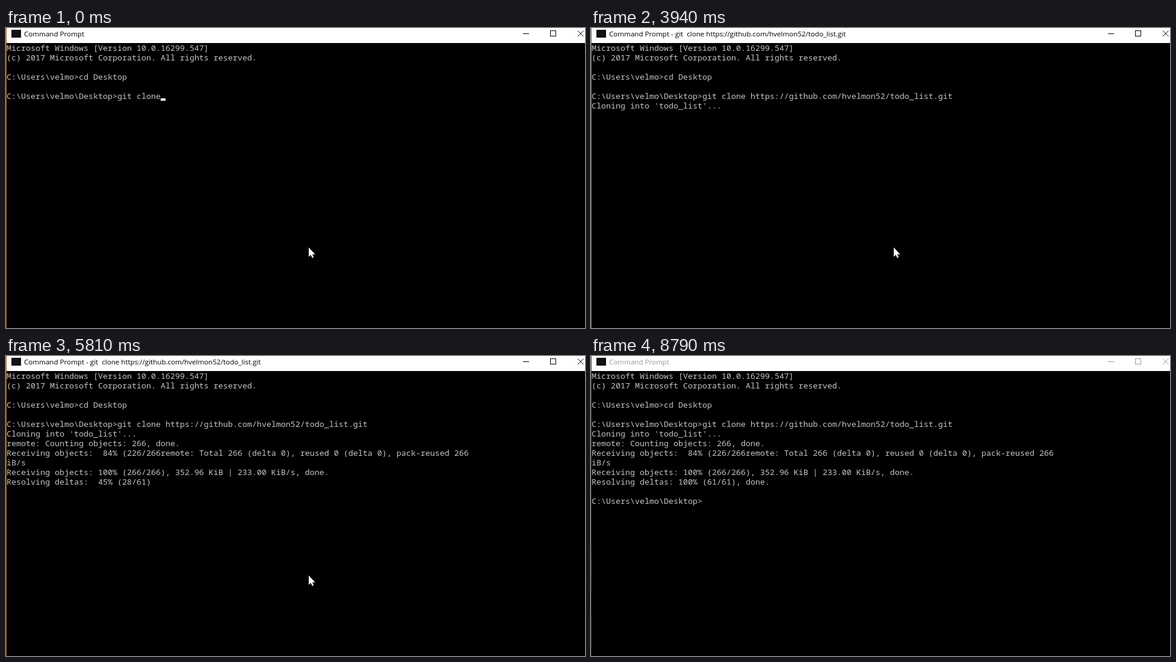
These frames come from a looping animation (962x499 px, 8910 ms). An HTML page:

```html
<!DOCTYPE html>
<html lang="en">
<head>
<meta charset="utf-8">
<title>Terminal clone</title>
<style>
  html, body { margin: 0; width: 100%; height: 100%; overflow: hidden; background: #000; }
  svg { display: block; width: 962px; height: 499px; }
  text { white-space: pre; }
  .bar { font: 11.6px "Open Sans", "Noto Sans", sans-serif; fill: #000; }
  .log { font: 13.3333px "Noto Sans Mono", "Liberation Mono", monospace; fill: #c2c5c8; font-variant-ligatures: none; }
  .buttons { fill: none; stroke: #000; }
  .edge { fill: #b5691d; }
  .idle .bar { fill: #999; }
  .idle .buttons { stroke: #999; }
  .idle .edge { fill: url(#behind); }
</style>
</head>
<body>
<svg id="stage" viewBox="0 0 962 499">
  <defs>
    <linearGradient id="behind" x1="0" y1="0" x2="0" y2="1">
      <stop offset="0" stop-color="#555"/>
      <stop offset=".06" stop-color="#4a4433"/>
      <stop offset=".6" stop-color="#222"/>
      <stop offset=".72" stop-color="#1d5a44"/>
      <stop offset=".82" stop-color="#222"/>
      <stop offset=".92" stop-color="#0f4a78"/>
      <stop offset="1" stop-color="#222"/>
    </linearGradient>
  </defs>
  <rect width="962" height="499"/>
  <rect width="962" height="25" fill="#fff"/>
  <rect class="edge" width="1" height="499"/>
  <rect x="9" y="3" width="16" height="13" fill="#111"/>
  <text id="title" class="bar" x="30" y="14"></text>
  <g class="buttons">
    <path d="M859 9.5h10M904.5 4.5h9v9h-9z" shape-rendering="crispEdges"/>
    <path d="M950 4.5l9.5 9.5M959.5 4.5l-9.5 9.5"/>
  </g>
  <g id="log" class="log"></g>
  <rect id="caret" width="8" height="4" fill="#fff"/>
  <path id="pointer" fill="#fff" d="M0 0V15.5L3.4 12.3L5.8 17.6L8.2 16.6L5.9 11.4H10.6Z"/>
</svg>
<script>
const LOOP = 8910, ROWS = 14, CELL = 8, LINE = 16, TOP = 25;
const home = 'C:\\Users\\velmo';
const prompt = home + '\\Desktop>';
const url = 'https://github.com/hvelmon52/todo_list.git';
const plain = 'Command Prompt';

const share = (done, all) =>
  `${String(Math.floor(done / all * 100)).padStart(3)}% (${done}/${all})`;
const receive = n => 'Receiving objects: ' + share(n, 266);
const resolve = n => 'Resolving deltas: ' + share(n, 61);

const start = {
  title: plain, caret: [32, 5], pointer: [503, 365], idle: false,
  0: 'Microsoft Windows [Version 10.0.16299.547]',
  1: '(c) 2017 Microsoft Corporation. All rights reserved.',
  3: home + '>cd Desktop',
  5: prompt + 'git clone'
};

// Each step overrides part of the state; number keys are log rows.
const steps = [
  [120, { caret: [33, 5] }],
  [240, { caret: null }],
  [740, { caret: [33, 5] }],
  [1110, { 5: prompt + 'git clone ' + url, caret: [75, 5] }],
  [1230, { caret: null }],
  [1730, { caret: [75, 5] }],
  [1880, { title: `${plain} - git  clone ${url}`, 6: "Cloning into 'todo_list'...", caret: [0, 7] }],
  [2760, { caret: null }],
  [3290, { caret: [0, 7] }],
  [3940, { caret: null }],
  [4190, { 7: 'remote: Counting objects: 266, done.' }],
  [4320, { 8: receive(3) }],
  [4440, { 8: receive(40) }],
  [4570, { 8: receive(88) }],
  [4940, { 8: receive(179) }],
  [5060, { 8: receive(226) + ', 252.01 KiB | 233.00 KiB/s' }],
  [5810, {
    8: receive(226).slice(0, -1) + 'remote: Total 266 (delta 0), reused 0 (delta 0), pack-reused 266',
    9: 'iB/s',
    10: receive(266) + ', 352.96 KiB | 233.00 KiB/s, done.',
    11: resolve(28)
  }],
  [5940, { 11: resolve(61) + ', done.' }],
  [6370, { title: plain, 13: prompt, caret: [23, 13] }],
  [6990, { caret: null }],
  [7520, { caret: [23, 13] }],
  [7890, { pointer: [690, 425] }],
  [8010, { pointer: [883, 486], caret: null }],
  [8170, { pointer: [892, 490] }],
  [8290, { pointer: null }],
  [8540, { caret: [23, 13] }],
  [8790, { caret: null, idle: true }]
];

const $ = id => document.getElementById(id);
const stage = $('stage'), title = $('title'), caret = $('caret'), pointer = $('pointer');

const rows = Array.from({ length: ROWS }, (_, i) => {
  const row = document.createElementNS('http://www.w3.org/2000/svg', 'text');
  row.setAttribute('x', 1);
  row.setAttribute('y', TOP + i * LINE + 13);
  return $('log').appendChild(row);
});

function place(node, at) {
  node.style.display = at ? '' : 'none';
  if (at) node.setAttribute('transform', `translate(${at})`);
}

function draw(state) {
  title.textContent = state.title;
  rows.forEach((row, i) => { row.textContent = state[i] || ''; });
  const cell = state.caret;
  place(caret, cell && [1 + cell[0] * CELL, TOP + cell[1] * LINE + 12]);
  place(pointer, state.pointer);
  stage.classList.toggle('idle', state.idle);
}

const began = performance.now();
let shown = -1;

function tick() {
  const t = (performance.now() - began) % LOOP;
  const past = steps.filter(([at]) => at <= t);
  if (past.length !== shown) {
    shown = past.length;
    draw(Object.assign({}, start, ...past.map(([, change]) => change)));
  }
  requestAnimationFrame(tick);
}
tick();
</script>
</body>
</html>
```
